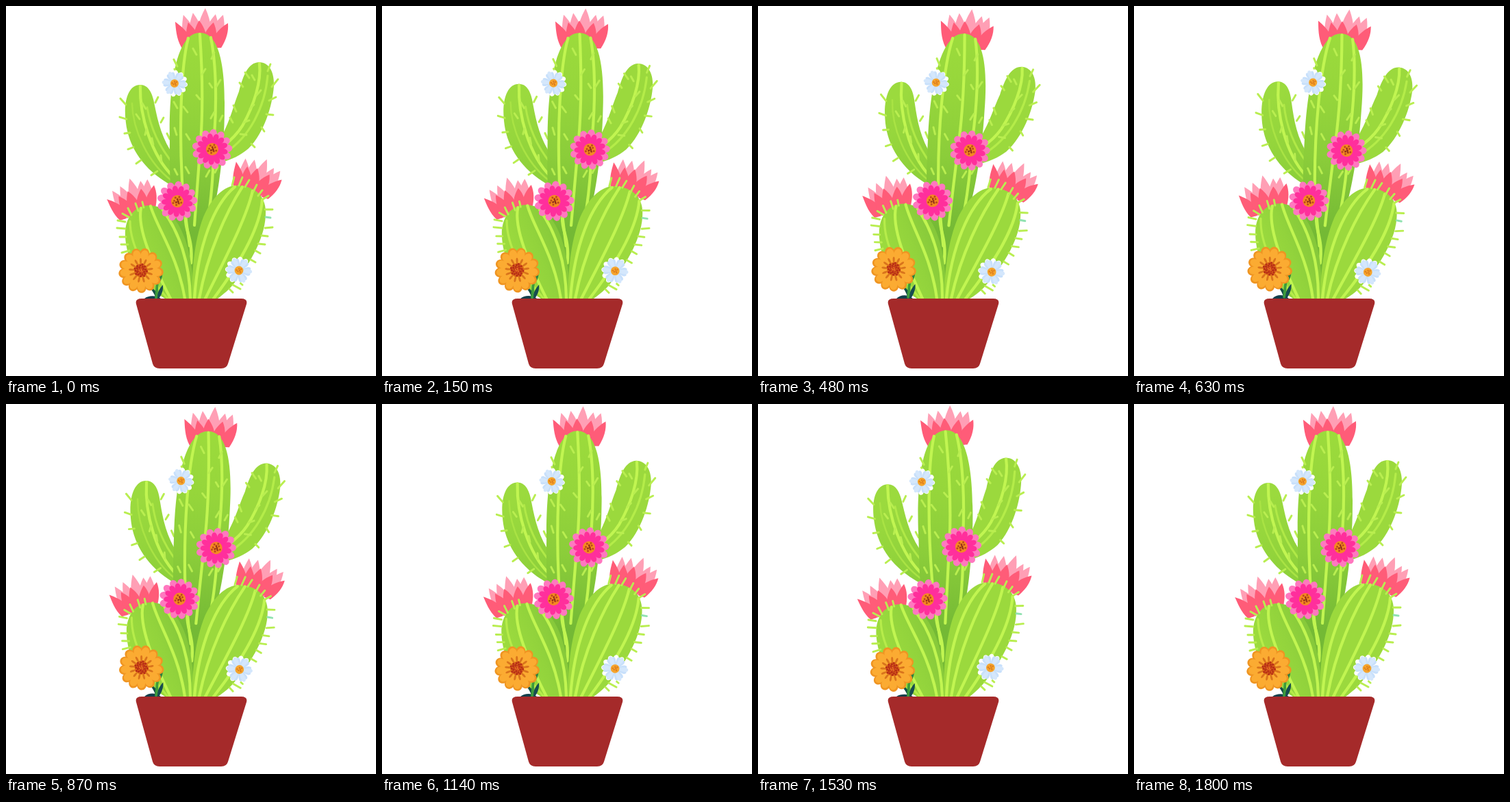
Write an HTML page that moves like this. It is 540x540 px and loops after 1830 ms.

```html
<!DOCTYPE html>
<html lang="en">
<head>
<meta charset="utf-8">
<title>Swaying cactus</title>
<style>
html, body { margin: 0; width: 100%; height: 100%; overflow: hidden; background: #fff; }
svg { display: block; width: 100%; height: 100%; }
</style>
</head>
<body>
<svg id="stage" viewBox="0 0 540 540">
  <defs>
    <linearGradient id="trunk" gradientUnits="userSpaceOnUse" x1="0" y1="40" x2="0" y2="330">
      <stop offset="0" stop-color="#9cdb3c"/><stop offset=".3" stop-color="#96d63b"/>
      <stop offset=".62" stop-color="#8bcd3a"/><stop offset="1" stop-color="#74b935"/>
    </linearGradient>
    <linearGradient id="armLeft" gradientUnits="userSpaceOnUse" x1="180" y1="150" x2="245" y2="240">
      <stop offset="0" stop-color="#9bda3e"/><stop offset="1" stop-color="#8dd03a"/>
    </linearGradient>
    <linearGradient id="lobeLeft" gradientUnits="userSpaceOnUse" x1="185" y1="360" x2="265" y2="330">
      <stop offset="0" stop-color="#9cdb3e"/><stop offset=".5" stop-color="#92d33c"/><stop offset="1" stop-color="#83c63a"/>
    </linearGradient>
  </defs>
</svg>
<script>
const NS = "http://www.w3.org/2000/svg";
const stage = document.getElementById("stage");
const LOOP = 1830, STEP = 30, SWAY = 1800;
const BASE_Y = 427, AXIS_X = 266;
const LIME = "#c1f551", SPINE = "#b9ee50", GREEN = "#9bd93d";
const bent = [], flowers = [];

function add(name, attrs, parent = stage) {
  const el = document.createElementNS(NS, name);
  for (const key in attrs) el.setAttribute(key, attrs[key]);
  parent.appendChild(el);
  return el;
}

// Paths registered here follow the bend point by point.
function fill(d, color) {
  bent.push({ el: add("path", { fill: color }), d });
}
function line(d, color = LIME, width = 4.2) {
  bent.push({
    el: add("path", { fill: "none", stroke: color, "stroke-width": width, "stroke-linecap": "round" }), d
  });
}
// Each spine is "x y dx dy".
function spines(list, color = SPINE) {
  line(list.split(",").map(item => {
    const [x, y, dx, dy] = item.trim().split(" ").map(Number);
    return `M${x} ${y} L${x + dx} ${y + dy}`;
  }).join(" "), color, 2.9);
}

function crown(cx, cy, angle, scale) {
  const a = angle * Math.PI / 180, c = Math.cos(a) * scale, s = Math.sin(a) * scale;
  const at = (x, y) => `${(cx + x * c - y * s).toFixed(2)} ${(cy + x * s + y * c).toFixed(2)}`;
  const petal = (x, y, half, color) => {
    const b = x * .62;
    fill(`M${at(x, y)} C${at(x * .8 - half * .65, y * .73)} ${at(b - half * 1.3, y * .3)} ${at(b - half * .5, 3)}` +
      ` L${at(b + half * .5, 3)} C${at(b + half * 1.3, y * .3)} ${at(x * .8 + half * .9, y * .65)} ${at(x, y)}Z`, color);
  };
  [[-26, -45], [32, -45], [-12, -48], [21, -46], [6, -55]].forEach(([x, y]) => petal(x, y, 11, "#ff9fb5"));
  [[-38, -35], [39, -33], [-19, -34], [18, -34], [-3, -37]].forEach(([x, y]) => petal(x, y, 10, "#ff5c78"));
}

function ring(group, count, inner, outer, half, color, turn = 0) {
  const mid = inner + (outer - inner) * .62;
  const d = `M0 ${-inner} C${-half * .6} ${-inner} ${-half} ${-mid + 3} ${-half} ${-mid}` +
    ` C${-half} ${-outer} ${half} ${-outer} ${half} ${-mid} C${half} ${-mid + 3} ${half * .6} ${-inner} 0 ${-inner}Z`;
  for (let i = 0; i < count; i++) {
    add("path", { d, fill: color, transform: `rotate(${turn + i * 360 / count})` }, group);
  }
}
function disc(group, r, color) {
  add("circle", { r, fill: color }, group);
}
function specks(group, count, radius, size, color) {
  for (let i = 0; i < count; i++) {
    const a = i * 2.4, r = radius * Math.sqrt((i + .5) / count);
    add("circle", { cx: r * Math.cos(a), cy: r * Math.sin(a), r: size, fill: color }, group);
  }
}
function flower(x, y, draw) {
  const el = add("g", {});
  draw(el);
  flowers.push({ el, x, y });
}
function pinkFlower(g) {
  ring(g, 13, 4, 32, 5.6, "#ff78bf", 4);
  ring(g, 13, 3, 25, 4.1, "#ff2f9c", 18);
  disc(g, 9, "#f58a21");
  specks(g, 11, 7, 1.5, "#b94a1c");
  specks(g, 4, 3, 1.2, "#8e2d18");
}
const daisy = size => g => {
  ring(g, 12, 3, size + 2, size * .2, "#ffffff", 6);
  ring(g, 12, 3, size - 1, size * .14, "#c8e0fb", 21);
  ring(g, 6, 3, size + 1, size * .16, "#d4e7fc", 36);
  disc(g, size * .32, "#f6a52d");
  specks(g, 6, size * .2, 1.2, "#dc7c1d");
};
function orangeFlower(g) {
  ring(g, 13, 3, 36, 7.3, "#ef9522", 12);
  ring(g, 13, 4, 33, 5.7, "#fbab32", 13);
  ring(g, 13, 8, 19, 1.5, "#d9741c", 26);
  disc(g, 10, "#d96a19");
  specks(g, 26, 9.5, 1.6, "#b82d17");
  disc(g, 3.8, "#c83d1a");
  specks(g, 5, 3, .9, "#ef8b27");
}

// Crowns and arms
crown(285, 58, 0, 1);
fill("M196 115 C178 115 171 140 175 170 C179 205 200 240 244 263 L246 220 C228 195 222 170 217 145 C214 127 208 115 196 115Z", "url(#armLeft)");
line("M196 117 C195 160 212 218 244 249");
line("M206 148 C211 178 224 206 244 230", "#b0e947", 3);
line("M184 142 C185 181 207 229 242 255", "#a9e344", 2.5);
spines("167 135 8 9, 166 162 10 3, 173 186 8 -1, 178 209 8 -3, 190 230 7 -5, 212 247 9 -6, 218 141 4 -8, 226 170 4 -7, 235 186 4 8, 199 142 5 8, 190 158 5 7, 205 180 -2 8, 213 193 2 9, 226 218 1 9");
fill("M369 82 C385 82 392 98 391 117 C389 145 377 185 354 208 C342 218 330 224 312 229 L315 190 C328 165 332 145 340 125 C346 102 353 83 369 82Z", GREEN);
line("M370 84 C373 110 362 145 345 175 C337 188 328 196 318 204");
line("M382 102 C378 148 355 192 320 214", "#b4ec49", 3.2);
spines("349 97 6 8, 346 118 -5 -6, 332 145 4 9, 327 163 4 7, 382 95 4 -10, 388 118 9 -11, 384 138 10 -5, 380 158 10 1, 373 177 4 6, 358 201 5 5, 363 108 -4 -7, 366 130 6 -7, 356 150 6 -6, 347 170 8 -3, 342 187 9 1");

// Trunk
fill("M262 427 C248 370 238 300 239 200 C237 110 250 39 283 39 C312 39 320 90 319 150 C319 200 312 270 298 320 L280 427Z", "url(#trunk)");
line("M266 47 C255 90 253 180 257 255 C259 290 264 320 268 350");
line("M283 41 C287 100 287 160 284 200 C280 250 278 280 275 320");
line("M299 46 C308 90 307 150 304 190 C303 230 302 260 297 296");
line("M262 310 C262 330 273 340 270 375", LIME, 4.5);
spines("245 78 5 10, 246 92 4 7, 245 140 5 9, 259 147 6 8, 246 178 3 10, 263 187 5 8, 262 235 5 9, 246 238 4 8, 273 62 5 9, 278 130 5 6, 291 92 -5 8, 304 68 -4 9, 313 108 -6 10, 301 119 -4 -6, 304 155 -5 9, 316 160 -4 8, 297 240 -5 9, 309 235 -4 8");

// Lower lobes
crown(191, 302, -18, .93);
crown(358, 270, 20, .93);
fill("M274 427 C273 380 267 345 251 318 C240 300 226 291 208 291 C185 292 173 312 174 335 C175 370 195 405 232 427Z", "url(#lobeLeft)");
line("M181 314 C181 350 206 395 236 427", "#b6ec4a", 3.2);
line("M197 295 C191 326 215 378 240 427");
line("M211 292 C220 323 251 365 261 427");
line("M229 298 C253 330 268 375 269 427");
spines("163 313 11 2, 162 324 12 1, 166 337 9 0, 168 348 10 0, 169 360 11 -3, 177 370 7 -4, 178 295 5 10, 189 288 4 11, 199 286 2 8, 170 303 9 5");
fill("M272 427 C271 390 274 345 288 308 C300 280 318 262 337 262 C362 262 379 277 379 300 C380 335 357 375 335 402 C327 413 317 421 309 427Z", GREEN);
line("M334 264 C303 290 280 350 275 427");
line("M345 264 C322 300 294 360 282 427");
line("M360 270 C350 312 319 370 291 427");
line("M374 283 C371 323 340 377 303 427");
spines("333 250 -3 12, 345 250 -5 12, 355 254 -6 10, 366 261 -5 10, 374 269 -6 8, 383 277 -8 5, 378 297 11 0, 378 324 11 -1, 373 335 9 1, 368 347 10 1, 364 357 7 4, 357 370 7 4, 338 401 7 6, 331 407 11 6, 326 413 5 5");
spines("379 308 7 1", "#90e2b0");

// Foliage and blossoms
fill("M202 427 C208 422 219 422 226 427Z", "#123f4b");
fill("M219 427 C216 418 211 412 207 409 C216 411 222 419 223 427Z", "#155047");
fill("M219 427 C221 418 225 411 229 407 C230 416 226 423 223 427Z", "#174c50");
line("M219 426 C221 412 219 401 225 388", "#3c9a3c", 3.8);
fill("M221 406 C220 396 223 389 228 385 C229 395 227 402 221 406Z", "#2d803f");
flower(301, 209, pinkFlower);
flower(250, 285, pinkFlower);
flower(246, 113, daisy(19));
flower(340, 386, daisy(20));
flower(197, 386, orangeFlower);

add("path", {
  d: "M198 427 H343 Q353 427 351 435 L324 522 Q322 529 314 529 H224 Q216 529 214 522 L190 435 Q188 427 198 427Z",
  fill: "#a52a2a"
});

const height = y => Math.max(0, BASE_Y - y);
const tilt = y => height(y) ? .028 + .000126 * height(y) : 0;
function bend(x, y, sway) {
  const h = height(y);
  return [x + sway * h * (.028 + .000063 * h), y + sway * tilt(y) * (x - AXIS_X)];
}

// A slightly sharpened cosine that leans further right than left.
function swayAt(t) {
  const phase = 2 * Math.PI * (t - 600) / SWAY;
  return (6.05 + 15.05 * (Math.cos(phase) + .09 * Math.cos(3 * phase))) / 22;
}

function render(time) {
  const t = Math.floor((time % LOOP) / STEP) * STEP;
  const sway = swayAt(t);
  for (const { el, d } of bent) {
    el.setAttribute("d", d.replace(/(-?[\d.]+) (-?[\d.]+)/g, (_, x, y) =>
      bend(+x, +y, sway).map(v => v.toFixed(2)).join(" ")));
  }
  for (const { el, x, y } of flowers) {
    const [px, py] = bend(x, y, sway);
    el.setAttribute("transform", `translate(${px} ${py}) rotate(${sway * tilt(y) * 180 / Math.PI})`);
  }
}

const start = performance.now();
function tick(now) {
  render(Math.max(0, now - start));
  requestAnimationFrame(tick);
}
render(0);
requestAnimationFrame(tick);
</script>
</body>
</html>
```
